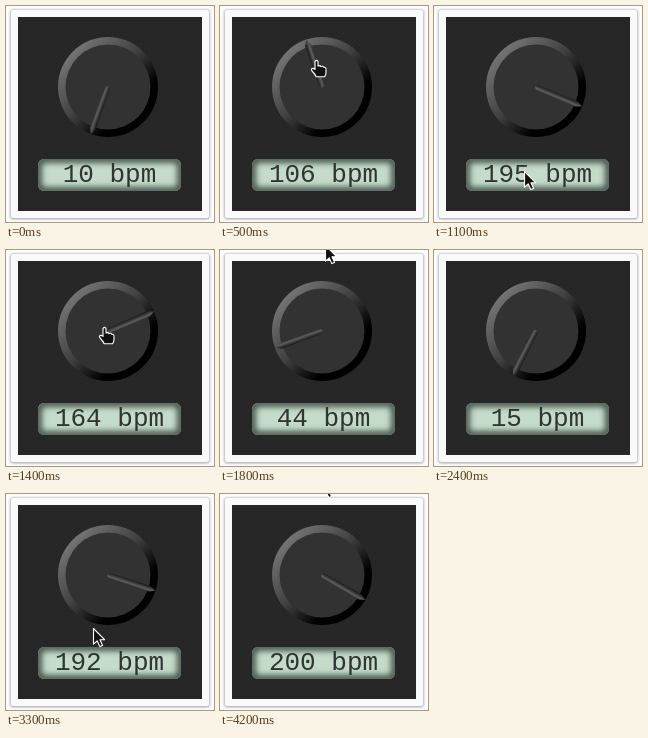
An HTML page for the animation above (4.5 s loop, 208 by 216 pixels).

```html
<!DOCTYPE html>
<html lang="en">
<head>
<meta charset="utf-8">
<title>Tempo knob</title>
<style>
html, body { margin: 0; width: 100%; height: 100%; overflow: hidden; background: #fff; }
svg { display: block; width: 208px; height: 216px; }
text { font: 26px "Liberation Mono", monospace; }
</style>
</head>
<body>
<svg viewBox="0 0 208 216">
  <defs>
    <pattern id="weave" width="4" height="4" patternUnits="userSpaceOnUse">
      <rect width="4" height="4" fill="#282828"/>
      <path d="M-1 1L1 -1M0 4L4 0M3 5L5 3" stroke="#242424" stroke-width="1.2"/>
    </pattern>
    <linearGradient id="rim" x1=".15" y1=".15" x2=".85" y2=".85">
      <stop offset="0" stop-color="#737373"/>
      <stop offset=".45" stop-color="#404040"/>
      <stop offset=".8" stop-color="#000"/>
    </linearGradient>
    <linearGradient id="bar">
      <stop offset="0" stop-color="#161616"/>
      <stop offset=".4" stop-color="#3c3c3c"/>
      <stop offset=".7" stop-color="#5e5e5e"/>
      <stop offset="1" stop-color="#3a3a3a"/>
    </linearGradient>
    <filter id="soft" x="-20%" y="-40%" width="140%" height="180%"><feGaussianBlur stdDeviation="3"/></filter>
    <filter id="halo"><feGaussianBlur stdDeviation="1.4"/></filter>
    <clipPath id="glass"><rect x="32" y="153" width="143" height="32" rx="6"/></clipPath>
  </defs>

  <rect x="4.5" y="4" width="199" height="209" rx="2" fill="#999" filter="url(#halo)"/>
  <rect x="5" y="4" width="198" height="208" rx="2" fill="#fafafa"/>
  <rect x="12" y="11" width="184" height="194" fill="url(#weave)"/>

  <circle cx="102" cy="81" r="50" fill="url(#rim)"/>
  <circle cx="102" cy="81" r="42.5" fill="#323232"/>
  <path id="needle" d="M-2.5 -1Q0 3 2.5 -1L3 -44L0 -50L-3 -44Z" fill="url(#bar)"/>

  <g clip-path="url(#glass)">
    <rect x="32" y="153" width="143" height="32" fill="#c6dccb"/>
    <rect x="32" y="153" width="143" height="32" rx="6" fill="none" stroke="#35423a" stroke-width="7" filter="url(#soft)"/>
  </g>
  <text id="label" x="103.5" y="176" text-anchor="middle" fill="#303432"></text>

  <g fill="#111" stroke="#fff" stroke-width="1.1" stroke-linejoin="round">
    <path id="arrow" d="M.5 .5V16.2L4.2 12.8L6.8 18.6L9.6 17.4L7 11.7H11.6Z"/>
    <path id="finger" d="M-2 9.5V1.5Q-.5 -.8 1 1.5V6Q3 5 4 6.6Q6 5.6 6.8 7.4Q9 6.8 9 9.5V12.5Q9 14.5 7.6 16.8H-.8Q-2 14 -5 11Q-6.4 8.8 -4.4 8.4Q-3.2 8.2 -2 9.5Z"/>
  </g>
</svg>
<script>
const LOOP = 4500, STEP = 100, CX = 102, CY = 81, RADIUS = 50;
const AWAY = -25; // pointer height when it is above the stage
const $ = id => document.getElementById(id);

// Key points of the drag: time in ms, pointer x, pointer y, bpm
const keys = [
  [0, 103, AWAY, 10], [100, 103, AWAY, 10],
  [800, 92, 114, 178], [1200, 89, 182, 200],
  [1400, 99, 77, 164], [1900, 106, AWAY, 14],
  [2000, 95, AWAY, 10], [2300, 95, AWAY, 10], [2400, 95, AWAY, 15],
  [2900, 91, 41, 107], [3300, 87, 134, 192], [3500, 82, 172, 200],
  [3600, 81, 102, 200], [3700, 102, AWAY, 200], [4100, 102, AWAY, 200],
  [4200, 102, -15, 200], [LOOP, 102, -15, 200]
];

function sample(t) {
  const i = keys.findIndex(k => k[0] > t);
  const a = keys[i - 1], b = keys[i];
  const p = (t - a[0]) / (b[0] - a[0]);
  return a.map((v, j) => Math.round(v + (b[j] - v) * p));
}

function place(el, on, x, y) {
  el.style.display = on ? "" : "none";
  el.setAttribute("transform", `translate(${x} ${y})`);
}

function draw(ms) {
  const t = Math.floor(ms % LOOP / STEP) * STEP;
  const [, x, y, bpm] = sample(t);
  const angle = 200 + (bpm - 10) * 280 / 190;
  $("label").textContent = bpm + " bpm";
  $("needle").setAttribute("transform", `translate(${CX} ${CY}) rotate(${angle})`);

  const over = Math.hypot(x - CX, y - CY) < RADIUS;
  place($("finger"), over, x, y);
  place($("arrow"), !over, x, y);
}

const start = performance.now();
function tick() {
  draw(performance.now() - start);
  requestAnimationFrame(tick);
}
tick();
</script>
</body>
</html>
```
